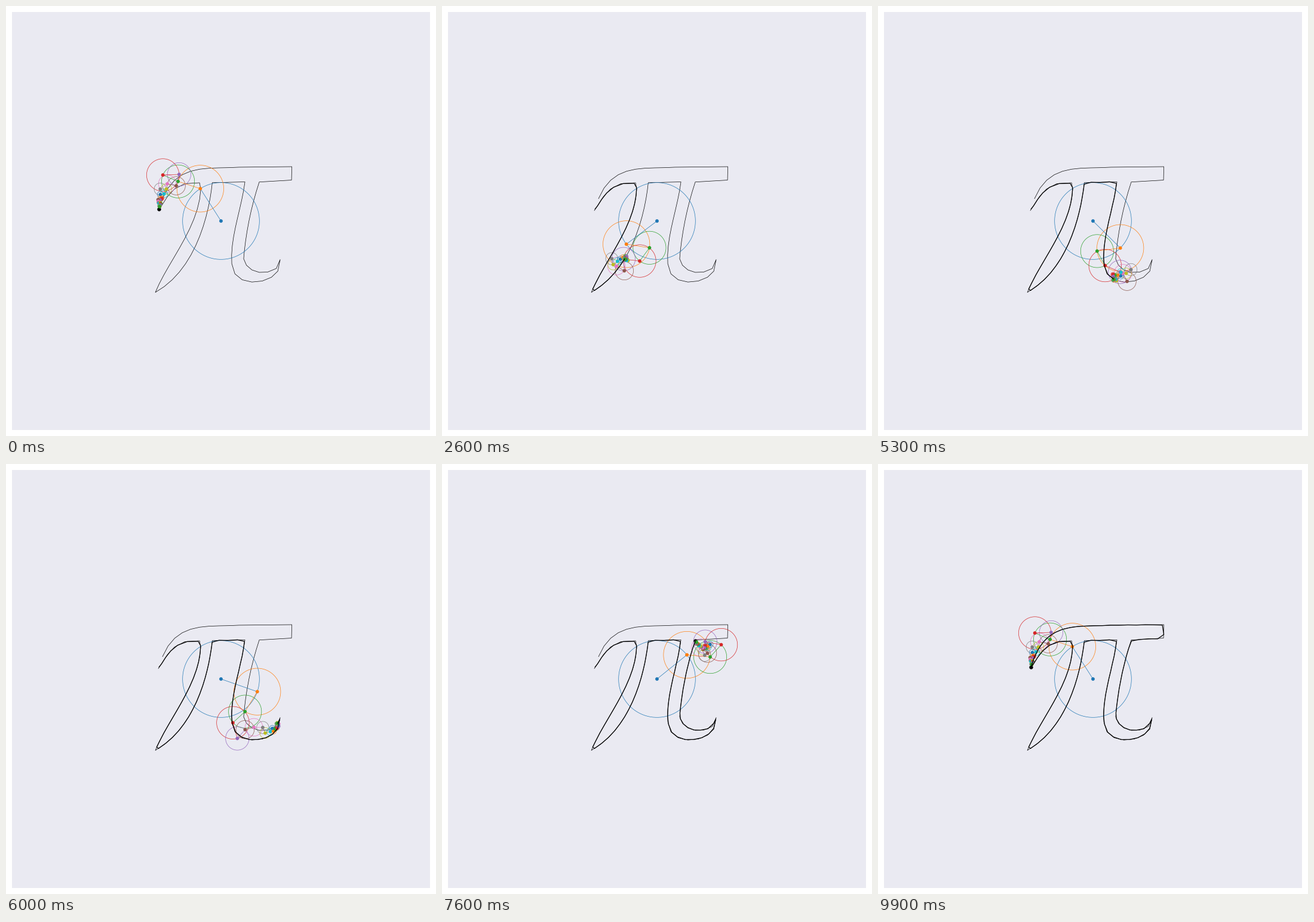
Write a matplotlib script that moves like this. It is 720 by 720 pixels and loops after 10000 ms.

```python
from math import comb

import numpy as np
import matplotlib.pyplot as plt
from matplotlib.animation import FuncAnimation
from matplotlib.collections import LineCollection

SIZE, DPI, MARGIN = 720, 100, 10
FRAMES, INTERVAL = 100, 100
MAX_FREQ = 50
FILL = 8  # extra samples per outline edge

path = [255 + 343j]


def curve(steps, *ctrl):
    """Extend the path by a Bezier curve of any degree."""
    pts = [path[-1], *ctrl]
    deg = len(pts) - 1
    for t in np.arange(1, steps + 1) / steps:
        path.append(sum(comb(deg, i) * t**i * (1 - t)**(deg - i) * p
                        for i, p in enumerate(pts)))


# left leg
curve(5, 265.5 + 331.6j, 276 + 290.5j, 324 + 296.5j)
curve(1, 326 + 307j)
curve(11, 323.6 + 369.8j, 270.7 + 428.8j, 250 + 480j)
curve(13, 318 + 442j, 340 + 349j, 345.3 + 296.3j)
curve(3, 400 + 295j)
# right leg and hook
curve(9, 394.2 + 340.6j, 374.8 + 387.9j, 378 + 432j)
curve(6, 379.5 + 473.5j, 440.7 + 468.1j, 455 + 444.5j)
curve(1, 459 + 425j)
curve(1, 452.5 + 440j)
curve(6, 424 + 458j, 390 + 438j, 399 + 411j)
curve(7, 405.5 + 351j, 424 + 295.2j)
# bar
curve(3, 478 + 292j)
curve(1, 478.5 + 269.5j)
curve(5, 390 + 270.4j)
curve(9, 339.6 + 274j, 286.9 + 262j, 262 + 323j)

path = np.array(path)
center = SIZE / 2 * (1 + 1j)
shape = path - path.mean() + center

# Fourier terms of the closed polygon, largest first; near ties fixed by lead
n = len(shape)
closed = np.append(shape, shape[0]) - center
dense = np.interp(np.arange(n * FILL) / FILL, np.arange(n + 1), closed)
spectrum = np.fft.fft(dense) / len(dense)
lead = [-1, -2, 3, 2, -4, 4, 1, -3]
rest = [f for f in range(-MAX_FREQ, MAX_FREQ + 1) if f and f not in lead]
rest.sort(key=lambda f: -abs(spectrum[f]))
freqs = np.array(lead + rest)
coefs = spectrum[freqs]
radii = np.abs(coefs)

times = np.linspace(0, 2 * np.pi, FRAMES)
spin = coefs * np.exp(1j * np.outer(times, freqs))
joints = center + np.hstack([np.zeros((FRAMES, 1)), np.cumsum(spin, axis=1)])
pen = joints[:, -1]
ring = np.exp(1j * np.linspace(0, 2 * np.pi, 91))
big = radii > 0.5


def xy(c):
    return np.stack([c.real, c.imag], axis=-1)


fig = plt.figure(figsize=(SIZE / DPI, SIZE / DPI), dpi=DPI, facecolor="white")
inner = (SIZE - 2 * MARGIN) / SIZE
ax = fig.add_axes([MARGIN / SIZE, MARGIN / SIZE, inner, inner], facecolor="#EAEAF2")
ax.set(xlim=(MARGIN, SIZE - MARGIN), ylim=(SIZE - MARGIN, MARGIN), xticks=[], yticks=[])
for spine in ax.spines.values():
    spine.set_visible(False)

colors = [f"C{i % 10}" for i in range(len(freqs))]
dot_colors = [c for c, b in zip(colors, big) if b]
ax.plot(shape.real, shape.imag, color="black", lw=0.5, zorder=2)
circles = ax.add_collection(LineCollection([], colors=colors, linewidths=0.5, zorder=3))
arms = ax.add_collection(LineCollection([], colors=colors, linewidths=0.5, zorder=4))
tip, = ax.plot([], [], "o", color="black", ms=4.6, mew=0, zorder=5)
hubs = joints[0, :-1][big]
dots = ax.scatter(hubs.real, hubs.imag, s=4.2 ** 2, c=dot_colors, linewidths=0, zorder=6)
trace, = ax.plot([], [], color="black", lw=0.9, zorder=7)


def update(k):
    starts, ends = joints[k, :-1], joints[k, 1:]
    circles.set_segments(xy(starts[:, None] + radii[:, None] * ring))
    arms.set_segments(xy(np.stack([starts, ends], axis=1)))
    dots.set_offsets(xy(starts[big]))
    trace.set_data(pen[:k + 1].real, pen[:k + 1].imag)
    tip.set_data([pen[k].real], [pen[k].imag])
    return circles, arms, tip, dots, trace


anim = FuncAnimation(fig, update, frames=FRAMES, interval=INTERVAL, repeat=True, repeat_delay=0)
plt.show()
```
